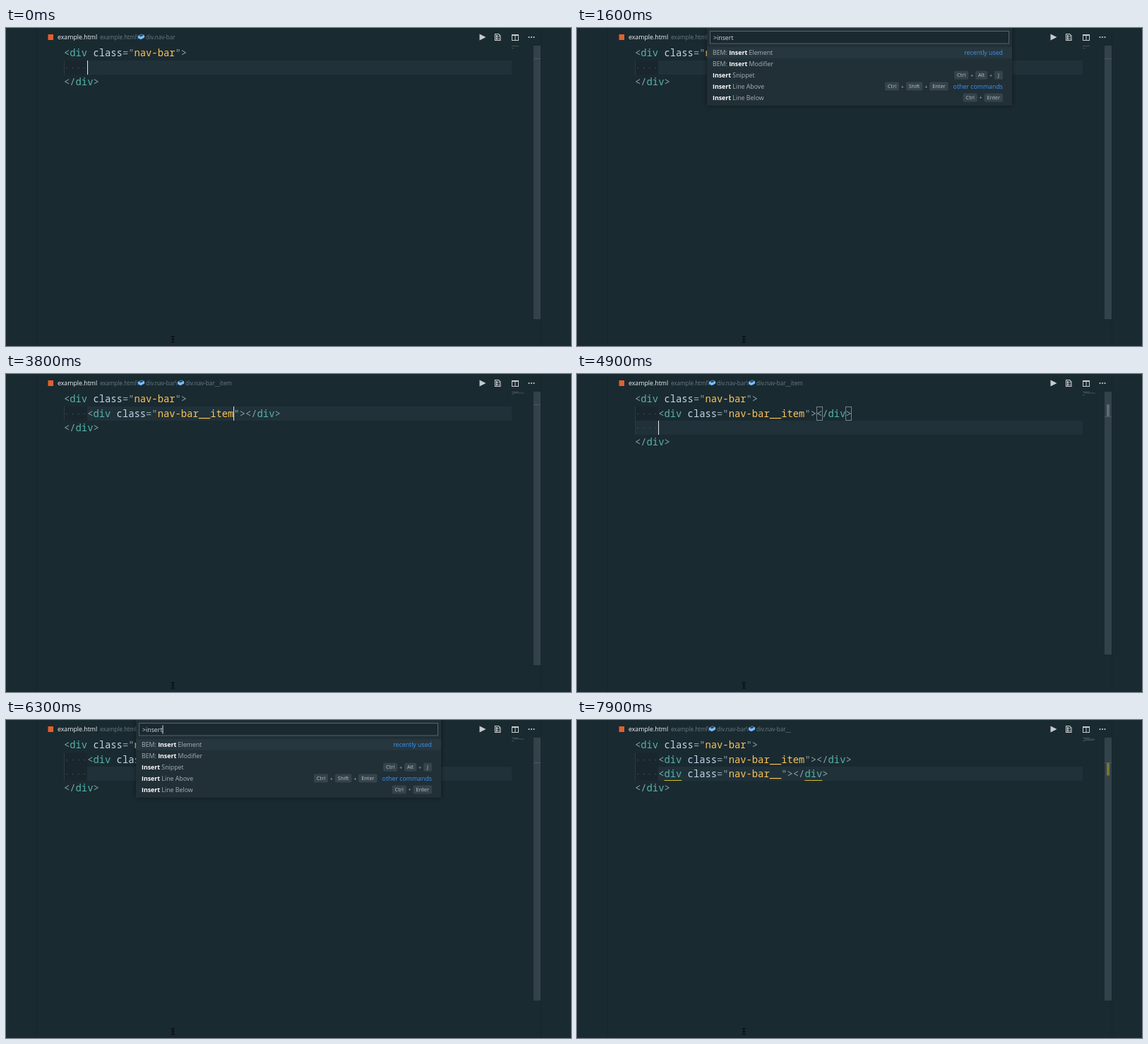
An HTML page with a canvas that plays this animation: 800x450 px, repeating every 8 s.

```html
<!DOCTYPE html>
<html lang="en">
<head>
<meta charset="utf-8">
<title>Code editor</title>
<style>
html, body { margin: 0; width: 100%; height: 100%; overflow: hidden; background: #1a2a31; }
canvas { display: block; width: 100vw; height: 100vh; }
</style>
</head>
<body>
<canvas id="stage" width="800" height="450"></canvas>
<script>
const ctx = document.getElementById('stage').getContext('2d');
const LOOP = 8000;
const UI = '"Open Sans", "Noto Sans", sans-serif';
const MONO = '13.82px "Noto Sans Mono", "DejaVu Sans Mono", monospace';
const X0 = 82, CHAR = 8.29, TOP = 25.3, LINE = 20.4, ROW = 15.83;
const C = {
  bg: '#1a2a31', line: '#203139', edge: '#17252c', punct: '#8aa1a6', tag: '#56b3ac',
  attr: '#c3d7ea', str: '#fbc45a', dots: '#43555d', ui: '#a9b2b7', icon: '#c8cccd',
  warn: '#d3bf2c', link: '#3b95f2', field: '#75beff'
};

const CTRL_ALT_J = ['Ctrl', 'Alt', 'J'];
const ABOVE = ['Ctrl', 'Shift', 'Enter'];
const BELOW = ['Ctrl', 'Enter'];
const RECENT = [
  ['BEM: Insert Element'], ['Editor Font Zoom In'], ['Developer: Reload Window'],
  ['BEM: Insert Modifier'], ['Preferences: Open Settings (JSON)'],
  ['Preferences: Open Settings (UI)'], ['Escape JSON String'],
  ['Insert Snippet', CTRL_ALT_J], ['Developer: Generate Color Theme From Current Settings'],
  ['File: Reveal in Explorer', ['Shift', 'Alt', 'R']]
];
const INSERTS = [['BEM: Insert Element'], ['BEM: Insert Modifier'], ['Insert Snippet', CTRL_ALT_J]];
const LINES = [['Insert Line Above', ABOVE], ['Insert Line Below', BELOW]];
const INSTALLS = [
  ['Extensions: Disable All Installed Extensions'],
  ['Extensions: Disable All Installed Extensions for this Workspace'],
  ['Extensions: Install Extensions'],
  ['Extensions: Install Specific Version of Extension...'],
  ['Extensions: Show Installed Extensions']
];

const PALETTES = [
  { open: 200, close: 2000, keys: [500, 600, 700, 800, 900, 1100] },
  { open: 5600, close: 7100, keys: [5800, 5900, 6000, 6100, 6200, 6300] }
];
const ITEM_KEYS = [2900, 3100, 3200, 3400];

const within = (t, a, b) => t >= a && t < b;
const countUntil = (times, t) => times.filter(k => k <= t).length;
const lastUntil = (times, t) => Math.max(...times.filter(k => k <= t));
const blinkOn = (t, since) => (t - since) % 1000 < 500;

function rect(x, y, w, h, color) {
  ctx.fillStyle = color;
  ctx.fillRect(x, y, w, h);
}

function text(s, x, y, size, color, weight = 400) {
  ctx.font = `normal ${weight} ${size}px ${UI}`;
  ctx.fillStyle = color;
  ctx.fillText(s, x, y);
  return x + ctx.measureText(s).width;
}

function widthOf(s, size) {
  ctx.font = `normal 400 ${size}px ${UI}`;
  return ctx.measureText(s).width;
}

function poly(points, color) {
  ctx.beginPath();
  points.forEach(([x, y]) => ctx.lineTo(x, y));
  ctx.closePath();
  ctx.fillStyle = color;
  ctx.fill();
}

function roundRect(x, y, w, h, r, color) {
  ctx.beginPath();
  ctx.roundRect(x, y, w, h, r);
  ctx.fillStyle = color;
  ctx.fill();
}

function editorState(t) {
  const typed = 'item'.slice(0, countUntil(ITEM_KEYS, t));
  const element = name => `    <div class="nav-bar__${name}"></div>`;
  const lines = ['<div class="nav-bar">', t < 2000 ? '    ' : element(typed)];
  if (t >= 4700) lines.push(t < 7100 ? '    ' : element(''));
  lines.push('</div>');

  let col = 4;
  if (within(t, 2000, 4200)) col = 25 + typed.length;
  else if (within(t, 4200, 4700)) col = 37;
  else if (t >= 7100) col = 25;

  let crumb = '';
  if (within(t, 2700, 3800) || t >= 7800) crumb = 'div.nav-bar__';
  else if (within(t, 3800, 5100)) crumb = 'div.nav-bar__item';

  return {
    lines, col, crumb,
    row: t < 4700 ? 1 : 2,
    moved: lastUntil([0, 2000, ...ITEM_KEYS, 4200, 4700, 7100], t),
    warn: within(t, 2700, 3800) || t >= 7800,
    rulerWarn: within(t, 2400, 3800) || t >= 7500,
    brackets: within(t, 4300, 5000),
    shadedRows: t < 5000 ? 1 : 2
  };
}

function cube(x) {
  poly([[x, 11], [x + 5.2, 8.4], [x + 9.1, 10.4], [x + 9.1, 13.6], [x + 3.9, 16.2], [x, 14.3]], C.field);
  poly([[x + 1.5, 11], [x + 5.2, 9.1], [x + 7.6, 10.4], [x + 3.9, 12.2]], '#2b3a44');
}

function titleBar(crumb) {
  const dim = '#6c7c84';
  rect(59.5, 9, 7.5, 8, '#e2602e');
  text('example.html', 73, 16.3, 8.8, '#f2f4f5');
  text('example.html\\', 133, 16.3, 8.05, dim);
  cube(187);
  text('div.nav-bar' + (crumb ? '\\' : ''), 198, 16.3, 8.05, dim);
  if (crumb) {
    cube(243);
    text(crumb, 254, 16.3, 8.05, dim);
  }
  toolbar();
}

function toolbar() {
  poly([[670.5, 8.5], [679.5, 13], [670.5, 17.5]], C.icon);
  ctx.strokeStyle = C.icon;
  ctx.lineWidth = 1.1;
  ctx.beginPath();
  ctx.moveTo(692.5, 8.5);
  ctx.lineTo(697.5, 8.5);
  ctx.lineTo(700, 11);
  ctx.lineTo(700, 17.5);
  ctx.lineTo(692.5, 17.5);
  ctx.closePath();
  ctx.stroke();
  for (const y of [10.5, 14]) {
    ctx.strokeRect(694.5, y, 1, 2);
    rect(697.5, y, 1, 2.5, C.icon);
  }
  ctx.lineWidth = 1;
  ctx.strokeRect(716.5, 9.5, 9, 8);
  rect(716, 9, 10, 2, C.icon);
  rect(720.5, 9, 1, 9, C.icon);
  for (const x of [740.5, 744, 747.5]) {
    ctx.beginPath();
    ctx.arc(x, 13, 1.1, 0, 7);
    ctx.fillStyle = C.icon;
    ctx.fill();
  }
}

function tokenColor(tok) {
  if (tok === 'div') return C.tag;
  if (tok === 'class') return C.attr;
  return /[\w-]/.test(tok) ? C.str : C.punct;
}

function codeLine(line, i) {
  const base = Math.round(TOP + i * LINE + 14.9);
  ctx.font = MONO;
  for (const m of line.matchAll(/\bdiv\b|\bclass\b|[\w-]+|[<>\/="]+/g)) {
    ctx.fillStyle = tokenColor(m[0]);
    [...m[0]].forEach((ch, k) => ctx.fillText(ch, X0 + (m.index + k) * CHAR, base));
  }
}

function editor(s, focused, t) {
  const y = Math.round(TOP + s.row * LINE);
  rect(X0, y, 634, 20, C.line);
  s.lines.forEach((line, i) => {
    if (line[0] === ' ') {
      const top = Math.round(TOP + i * LINE);
      if (i <= s.shadedRows) rect(X0, top, 33, 20, '#1a262d');
      rect(X0, top, 1, 20, '#2c3b43');
      for (let k = 0; k < 4; k++) rect(X0 + k * CHAR + 3.6, top + 10, 1.3, 1.3, C.dots);
    }
    codeLine(line, i);
    rect(716 + (line[0] === ' ' ? 2 : 0), 25.2 + i * 1.4, line.trim().length * 0.47, 0.8, 'rgba(150,172,178,.4)');
  });
  if (s.warn) {
    const second = s.lines[s.row].lastIndexOf('div');
    for (const col of [5, second]) rect(X0 + col * CHAR, y + 19, CHAR * 3, 1, C.warn);
  }
  if (s.brackets) {
    ctx.strokeStyle = '#71858a';
    ctx.lineWidth = 1;
    for (const col of [31, 36]) ctx.strokeRect(Math.round(X0 + col * CHAR) + 0.5, 46.5, 8, 19);
  }
  if (focused && blinkOn(t, s.moved)) rect(Math.round(X0 + s.col * CHAR), y, 1, 20, '#e4e8ea');
}

function ruler(s) {
  const bottom = s.lines.length > 3 ? 397 : 412;
  const mark = s.row === 1 ? 43 : 60;
  rect(747, 25, 10, bottom - 25, '#34434b');
  rect(747, mark, 10, 1, '#4c5b63');
  if (s.rulerWarn) rect(750, mark + 1, 4, 17.5, '#767535');
  if (s.brackets) rect(750, 43, 4, 17, '#5d6c74');
}

// Letters of the query found in a label, as [start, end] spans
function matches(label, q) {
  if (!q) return [];
  const low = label.toLowerCase();
  const at = low.indexOf(q);
  if (at >= 0) return [[at, at + q.length]];
  const ins = low.indexOf('ins');
  const ext = label.indexOf('E', ins);
  return [[ins, ins + 3], [ext, ext + 1]];
}

function label(s, q, x, y) {
  let pos = 0;
  for (const [a, b] of matches(s, q)) {
    x = text(s.slice(pos, a), x, y, 8.8, C.ui);
    x = text(s.slice(a, b), x, y, 8.8, '#fff', 700);
    pos = b;
  }
  text(s.slice(pos), x, y, 8.8, C.ui);
}

function keyCaps(keys, right, y) {
  [...keys].reverse().forEach((key, i) => {
    const tw = widthOf(key, 7.4);
    const w = Math.max(12, tw + 8);
    if (i) text('+', right + 2.8, y + 3, 7.4, C.ui);
    roundRect(right - w, y - 6, w, 12, 2, '#35434b');
    text(key, right - w + (w - tw) / 2, y + 2.7, 7.4, '#b9c1c5');
    right -= w + 9.8;
  });
}

function rowsFor(q) {
  if (q.length < 3) return RECENT;
  if (q.length < 5) return [...INSERTS, ...INSTALLS, ...LINES];
  return [...INSERTS, ...LINES];
}

function palette(p, t) {
  const q = 'insert'.slice(0, countUntil(p.keys, t));
  const rows = rowsFor(q);
  const h = 30.7 + rows.length * ROW;
  ctx.save();
  ctx.shadowColor = 'rgba(0,0,0,.45)';
  ctx.shadowBlur = 6;
  rect(184, -4, 432, h + 4, '#212f37');
  ctx.restore();

  rect(188, 4, 424, 18.5, '#1a2830');
  ctx.strokeStyle = '#56656d';
  ctx.lineWidth = 1;
  ctx.strokeRect(188.5, 4.5, 423, 17.5);
  const end = text('>' + q, 193, 16.8, 8.8, '#d3d9dc');
  if (blinkOn(t, lastUntil([p.open, ...p.keys], t))) rect(end, 7.5, 1, 12, '#dfe4e6');

  rect(184, 27, 432, ROW, '#273740');
  rows.forEach(([name, keys], i) => {
    const y = 35.1 + i * ROW;
    let right = 603;
    label(name, q, 192, y + 3.1);
    const note = i === 0 ? 'recently used' : i === 3 && rows !== RECENT ? 'other commands' : '';
    if (note) {
      const w = widthOf(note, 8.8);
      text(note, right - w, y + 3.1, 8.8, C.link);
      right -= w + 7;
    }
    if (keys) keyCaps(keys, right, y);
  });
}

function pointer() {
  const ink = '#0a1115';
  rect(233.5, 436, 5.5, 1.3, ink);
  rect(233.5, 444, 5.5, 1.3, ink);
  rect(235.6, 437, 1.4, 8, ink);
  rect(234.3, 440.2, 4, 1.2, ink);
}

function draw(t) {
  const s = editorState(t);
  const open = PALETTES.find(p => within(t, p.open, p.close));
  rect(0, 0, 800, 450, C.bg);
  rect(43, 0, 1, 450, C.edge);
  rect(757, 0, 1, 450, C.edge);
  editor(s, !open, t);
  ruler(s);
  titleBar(s.crumb);
  if (open) palette(open, t);
  pointer();
}

const start = performance.now();
function frame() {
  draw((performance.now() - start) % LOOP);
  requestAnimationFrame(frame);
}
frame();
</script>
</body>
</html>
```
